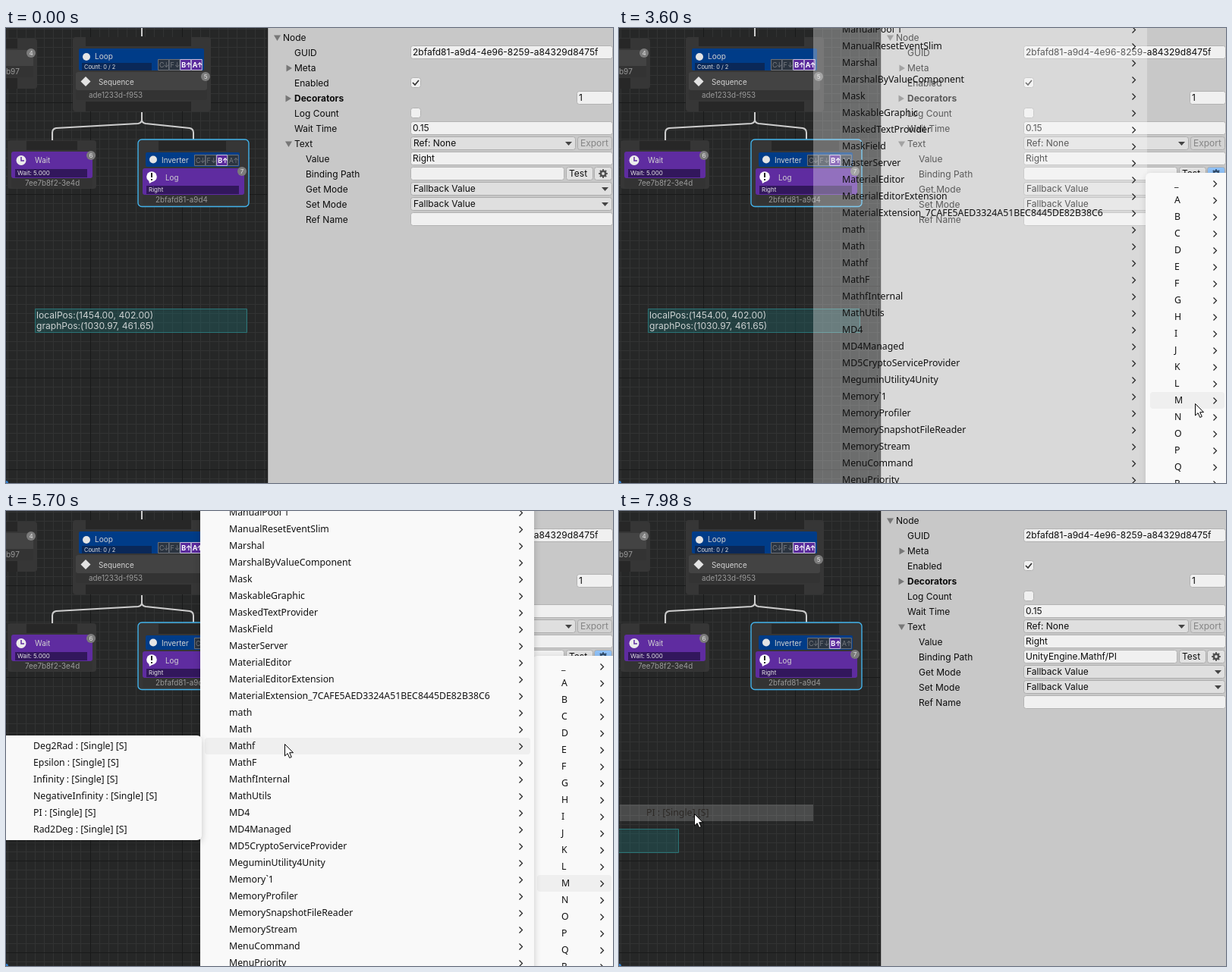
These frames come from a looping animation (800x600 px, 8000 ms). An HTML page with a canvas:

```html
<!DOCTYPE html>
<html lang="en">
<head>
<meta charset="utf-8">
<title>Binding path menu</title>
<style>
html, body { margin: 0; width: 100%; height: 100%; overflow: hidden; background: #c8c8c8; }
canvas { display: block; }
</style>
</head>
<body>
<canvas id="stage" width="800" height="600"></canvas>
<script>
const ctx = document.getElementById('stage').getContext('2d');
const LOOP = 8000, STEP = 60;
const UI = 'Inter, "Liberation Sans", sans-serif';
const MENU = '"Noto Sans", "Open Sans", sans-serif';

const LETTERS = [...'_ABCDEFGHIJKLMNOPQR'];
const TYPES = ('ManualPool`1 ManualResetEventSlim Marshal MarshalByValueComponent Mask MaskableGraphic ' +
  'MaskedTextProvider MaskField MasterServer MaterialEditor MaterialEditorExtension ' +
  'MaterialExtension_7CAFE5AED3324A51BEC8445DE82B38C6 math Math Mathf MathF MathfInternal MathUtils ' +
  'MD4 MD4Managed MD5CryptoServiceProvider MeguminUtility4Unity Memory`1 MemoryProfiler ' +
  'MemorySnapshotFileReader MemoryStream MenuCommand MenuPriority').split(' ');
const MEMBERS = ['Deg2Rad', 'Epsilon', 'Infinity', 'NegativeInfinity', 'PI', 'Rad2Deg']
  .map(s => s + ' : [Single] [S]');

// Pointer moves: start, end, from, bend, to
const MOVES = [
  [600, 1380, [799, 79], [796, 134], [791, 190]],
  [2520, 3300, [791, 190], [804, 342], [759, 495]],
  [4260, 5100, [759, 495], [660, 530], [391, 307]],
  [5640, 6240, [391, 307], [263, 309], [134, 308]],
  [6540, 7140, [134, 308], [126, 352], [99, 399]]
];

function pointer(t) {
  if (t <= MOVES[0][0]) return [900, 0];
  let p;
  for (const [a, b, from, bend, to] of MOVES) {
    if (t <= a) break;
    const q = Math.min(1, (t - a) / (b - a)) ** 0.72;
    const e = q * q * (3 - 2 * q), r = 1 - e;
    p = from.map((v, i) => r * r * v + 2 * r * e * bend[i] + e * e * to[i]);
  }
  return p.map(Math.round);
}

function rect(x, y, w, h, fill) {
  ctx.fillStyle = fill;
  ctx.fillRect(x, y, w, h);
}

function box(x, y, w, h, r, fill, line, width = 1) {
  const inset = line ? 0.5 : 0;
  ctx.beginPath();
  ctx.roundRect(x + inset, y + inset, w - 2 * inset, h - 2 * inset, r);
  if (fill) { ctx.fillStyle = fill; ctx.fill(); }
  if (line) { ctx.strokeStyle = line; ctx.lineWidth = width; ctx.stroke(); }
}

function disc(x, y, r, fill) {
  ctx.beginPath();
  ctx.arc(x, y, r, 0, 7);
  ctx.fillStyle = fill;
  ctx.fill();
}

function shape(points, fill) {
  ctx.beginPath();
  points.forEach(p => ctx.lineTo(p[0], p[1]));
  ctx.closePath();
  ctx.fillStyle = fill;
  ctx.fill();
}

// y is the middle of the capitals
function text(s, x, y, size, fill, font = UI, weight = 400) {
  ctx.font = `${weight} ${size}px ${font}`;
  ctx.fillStyle = fill;
  ctx.fillText(s, x, Math.round(y + size * 0.36));
}

function grid() {
  rect(0, 0, 345, 600, '#262727');
  const gap = 12.1;
  for (const [dark, fill] of [[false, '#323333'], [true, '#191a1a']]) {
    for (let i = -10; i < 50; i++) {
      if ((i % 10 === 0) !== dark) continue;
      rect(Math.round(110.5 + i * gap), 0, 1, 600, fill);
      rect(0, Math.round(98 + i * gap), 345, 1, fill);
    }
  }
}

function badge(n, x, y) {
  disc(x, y, 6, '#7b7b7b');
  ctx.textAlign = 'center';
  text(n, x, y, 8, '#e2e2e2');
  ctx.textAlign = 'left';
}

function flags(x, y, lit) {
  ['C↓', 'F↓', 'B↑', 'A↑'].forEach((s, i) => {
    const on = lit.includes(s[0]), left = x + i * 14.6;
    box(left, y, 15, 15, 0, on ? '#5a2a9c' : '#2b3440', on ? '#c9c0dc' : '#6c7078');
    text(s[0], left + 2, y + 7.5, 9, on ? '#fff' : '#777b80', UI, on ? 700 : 400);
    text(s[1], left + 7.5, y + 7.5, 9, on ? '#fff' : '#777b80', UI, on ? 700 : 400);
  });
}

function edges() {
  ctx.strokeStyle = '#cdcdcd';
  ctx.lineWidth = 2;
  ctx.beginPath();
  ctx.moveTo(179, 0);
  ctx.lineTo(179, 11);
  for (const x of [61, 247]) {
    const s = Math.sign(x - 179);
    ctx.moveTo(179, 111);
    ctx.lineTo(179, 121);
    ctx.quadraticCurveTo(179, 125, 179 + 5 * s, 126);
    ctx.lineTo(x - 5 * s, 132);
    ctx.quadraticCurveTo(x, 133, x, 138);
    ctx.lineTo(x, 148);
  }
  ctx.stroke();
}

function nodes() {
  const frame = '#363636', port = '#272727', body = '#434343', foot = '#333';
  const blue = '#003c88', purple = '#5f2ca0', pale = '#d2d2d2', dim = '#9a9a9a';

  box(-10, 14, 51, 66, 4, frame);
  rect(0, 14, 15, 13, port);
  rect(0, 66, 15, 14, port);
  rect(0, 29, 36, 21, body);
  rect(0, 50, 36, 15, foot);
  text('b97', 0, 57, 10, dim);
  badge('4', 33, 33);

  box(88, 12, 182, 98, 4, frame);
  rect(105, 12, 139, 12, port);
  rect(105, 97, 139, 13, port);
  box(96, 27, 165, 29, 2, blue);
  disc(106, 38, 5, '#e4e4e4');
  text('Loop', 117, 37, 10, pale);
  rect(100, 46, 92, 10, '#0a2858');
  text('Count: 0 / 2', 103, 51, 7.4, '#e4e4e4');
  flags(200, 41, 'BA');
  box(92, 58, 173, 37, 3, foot);
  box(92, 58, 173, 24, 3, body);
  shape([[105, 64], [111.5, 70.5], [105, 77], [98.5, 70.5]], '#e4e4e4');
  text('Sequence', 122, 71, 9.8, pale);
  text('ade1233d-f953', 109, 88, 9.8, dim);
  badge('5', 263, 64);

  box(2, 148, 117, 64, 4, frame);
  rect(27, 149, 67, 12, port);
  box(7, 163, 107, 48, 3, foot);
  box(7, 163, 107, 35, 3, purple);
  disc(20, 174.5, 6.5, '#ececec');
  ctx.beginPath();
  ctx.moveTo(20, 170);
  ctx.lineTo(20, 175);
  ctx.lineTo(24, 175);
  ctx.strokeStyle = purple;
  ctx.lineWidth = 1.5;
  ctx.stroke();
  text('Wait', 38, 174, 9.8, pale);
  rect(12, 186, 95, 11, '#32175c');
  text('Wait: 5.000', 15, 191, 8, '#e4e4e4');
  text('7ee7b8f2-3e4d', 25, 204, 9.8, dim);
  badge('6', 112, 168);

  box(173.5, 146.5, 147, 89.5, 5, frame, '#42b2ea', 1.4);
  rect(201, 149, 89, 13, port);
  box(184, 164, 124, 19, 2, blue);
  disc(194, 173.5, 5, '#e4e4e4');
  text('Inverter', 205, 174, 9.8, pale);
  flags(248, 167, 'B');
  box(180, 185, 134, 48, 3, foot);
  box(180, 185, 134, 35, 3, purple);
  disc(192, 196, 6.8, '#fff');
  shape([[188, 200], [194, 202], [189, 205]], '#fff');
  rect(191, 191, 2, 6, '#222');
  rect(191, 199, 2, 2, '#222');
  text('Log', 210, 197, 9.8, pale);
  rect(185, 208, 122, 11, '#32175c');
  text('Right', 188, 213, 8, '#e4e4e4');
  text('2bfafd81-a9d4', 197, 226, 9.8, dim);
  badge('7', 311, 189);
}

function readout(x, y) {
  box(x, y, 280, 32, 0, 'rgba(32,100,104,.4)', '#2b7577');
  text('localPos:(1454.00, 402.00)', x + 2, y + 8.5, 12.1, '#cdd2d2');
  text('graphPos:(1030.97, 461.65)', x + 2, y + 23, 12.1, '#cdd2d2');
}

function graph(moved) {
  ctx.save();
  ctx.beginPath();
  ctx.rect(0, 0, 345, 600);
  ctx.clip();
  grid();
  edges();
  nodes();
  if (moved) readout(-201, 419); else readout(38, 370);
  disc(0, 600, 3, '#2f7fd0');
  ctx.restore();
}

function inspector(mouse, pressed, path) {
  const ink = '#0c0c0c';
  const over = (x, y, w) => mouse && mouse[0] >= x && mouse[0] < x + w && mouse[1] >= y && mouse[1] < y + 19;
  const field = (x, y, w, s = '') => {
    box(x, y, w, 18, 3, '#f0f0f0', over(x, y, w) ? '#7a7a7a' : '#b2b2b2');
    text(s, x + 3, y + 9, 12, ink);
  };
  const button = (x, y, w, s, color = ink, fill = '#e2e2e2') => {
    box(x, y, w, 18, 3, over(x, y, w) && fill === '#e2e2e2' ? '#ececec' : fill, '#adadad');
    text(s, x + 4, y + 9, 12, color);
  };
  const drop = (y, w, s) => {
    button(533, y, w, s, ink, '#dfdfdf');
    const x = 533 + w - 10;
    shape([[x - 4, y + 7], [x + 5, y + 7], [x + 0.5, y + 12]], '#444');
  };
  const check = (y, on) => {
    box(533, y, 14, 14, 3, '#f0f0f0', '#b2b2b2');
    if (!on) return;
    ctx.beginPath();
    ctx.moveTo(536, y + 7);
    ctx.lineTo(539, y + 10);
    ctx.lineTo(544, y + 4);
    ctx.strokeStyle = '#333';
    ctx.lineWidth = 1.7;
    ctx.stroke();
  };
  const fold = (x, y, open) => shape(open
    ? [[x - 4.5, y - 3.5], [x + 4.5, y - 3.5], [x, y + 4]]
    : [[x - 3.5, y - 4.5], [x + 4, y], [x - 3.5, y + 4.5]], '#777');

  rect(344, 0, 1, 600, '#1c1c1c');
  rect(345, 0, 1, 600, '#a0a0a0');
  rect(346, 0, 454, 600, '#c8c8c8');
  const labels = ['Node', 'GUID', 'Meta', 'Enabled', 'Decorators', 'Log Count', 'Wait Time', 'Text',
    'Value', 'Binding Path', 'Get Mode', 'Set Mode', 'Ref Name'];
  labels.forEach((s, i) => {
    const x = i === 0 ? 365 : i < 8 ? 380 : 395;
    text(s, x, 13 + i * 20, 12, ink, UI, i === 4 ? 700 : 400);
  });
  fold(357.5, 13, true);
  fold(373, 53, false);
  fold(372, 93, false);
  fold(372.5, 153, true);
  field(533, 23, 267, '2bfafd81-a9d4-4e96-8259-a84329d8475f');
  check(65, true);
  field(752, 83, 48, '1');
  check(105, false);
  field(533, 123, 267, '0.15');
  drop(143, 218, 'Ref: None');
  button(753, 143, 46, 'Export', '#858585', '#d2d2d2');
  field(533, 163, 267, 'Right');
  field(533, 183, 203, path);
  button(738, 183, 36, 'Test');
  button(775, 183, 24, '', ink, pressed ? '#8fc1f7' : '#e2e2e2');
  gear(787, 192, pressed ? '#35506f' : '#505050');
  drop(203, 266, 'Fallback Value');
  drop(223, 266, 'Fallback Value');
  field(533, 243, 267);
}

function gear(x, y, color) {
  ctx.strokeStyle = color;
  ctx.lineWidth = 2.6;
  ctx.beginPath();
  ctx.arc(x, y, 3.2, 0, 7);
  ctx.stroke();
  ctx.lineWidth = 2;
  ctx.beginPath();
  for (let i = 0; i < 8; i++) {
    const c = Math.cos(i * Math.PI / 4), s = Math.sin(i * Math.PI / 4);
    ctx.moveTo(x + 3.5 * c, y + 3.5 * s);
    ctx.lineTo(x + 5.8 * c, y + 5.8 * s);
  }
  ctx.stroke();
}

function menu(m, alpha, sel) {
  if (alpha <= 0) return;
  const { x, y, w, h, items, tx, first, arrow } = m;
  ctx.save();
  ctx.globalAlpha = alpha;
  if (alpha === 1) {
    ctx.shadowColor = 'rgba(0,0,0,.2)';
    ctx.shadowBlur = 10;
    ctx.shadowOffsetY = 3;
  }
  ctx.beginPath();
  ctx.roundRect(x, y, w, h, 6);
  ctx.fillStyle = '#f9f9f9';
  ctx.fill();
  ctx.restore();
  items.forEach((s, i) => {
    const cy = first + i * 22;
    if (i === sel) box(m.hx, cy - 11, m.hw, 22, 4, '#efefef');
    text(s, tx, cy, 12.3, '#111', MENU);
    if (!arrow) return;
    ctx.beginPath();
    ctx.moveTo(arrow, cy - 3.5);
    ctx.lineTo(arrow + 4, cy + 0.5);
    ctx.lineTo(arrow, cy + 4.5);
    ctx.strokeStyle = '#222';
    ctx.lineWidth = 1.2;
    ctx.stroke();
  });
}

const letterMenu = { x: 694, y: 191, w: 130, h: 450, items: LETTERS, tx: 732, first: 205, arrow: 783.5, hx: 700, hw: 98 };
const typeMenu = { x: 256, y: -20, w: 440, h: 660, items: TYPES, tx: 294, first: 2, arrow: 676.5, hx: 262, hw: 429 };
const memberMenu = { x: -10, y: 296, w: 268, h: 138, items: MEMBERS, tx: 36, first: 310, arrow: 0, hx: 4, hw: 250 };

const opening = (t, start) => t < start ? 0 : Math.min(1, (t - start + STEP) / (3 * STEP));
const rowAt = (m, y) => Math.floor((y - m.first + 11) / 22);

function menus(t, mx, my) {
  const types = opening(t, 3600), members = opening(t, 5400);
  menu(letterMenu, opening(t, 2040), types ? 13 : rowAt(letterMenu, my));
  const inTypes = mx >= 256 && mx < 696;
  menu(typeMenu, types, members ? 14 : inTypes ? rowAt(typeMenu, my) : -1);
  menu(memberMenu, members, mx < 258 ? rowAt(memberMenu, my) : -1);
}

function chosenItem(t) {
  const left = 1 - (t - 7800) / 220;
  ctx.globalAlpha = left;
  rect(1, 387, 255, 22, '#efefef');
  ctx.globalAlpha = 0.6 + 0.4 * left;
  text(MEMBERS[4], 36, 398, 12.3, '#1e1814', MENU);
  ctx.globalAlpha = 1;
}

function arrow(x, y) {
  ctx.save();
  ctx.translate(x + 0.5, y + 0.5);
  ctx.beginPath();
  [[0, 0], [0, 15.5], [3.6, 12.2], [6.2, 18], [8.8, 16.9], [6.2, 11.2], [11, 11.2]]
    .forEach(p => ctx.lineTo(p[0], p[1]));
  ctx.closePath();
  ctx.fillStyle = '#fff';
  ctx.fill();
  ctx.strokeStyle = '#000';
  ctx.lineWidth = 1;
  ctx.stroke();
  ctx.restore();
}

function draw(time) {
  const t = Math.floor(time % LOOP / STEP) * STEP;
  const [mx, my] = pointer(t);
  const chosen = t >= 7800, applied = t >= 7860;
  graph(applied);
  inspector(t < 1560 ? [mx, my] : null, t >= 1560 && !chosen, applied ? 'UnityEngine.Mathf/PI' : '');
  if (chosen) chosenItem(t); else menus(t, mx, my);
  arrow(mx, my);
}

const begin = performance.now();
function tick() {
  draw(performance.now() - begin);
  requestAnimationFrame(tick);
}
tick();
</script>
</body>
</html>
```
